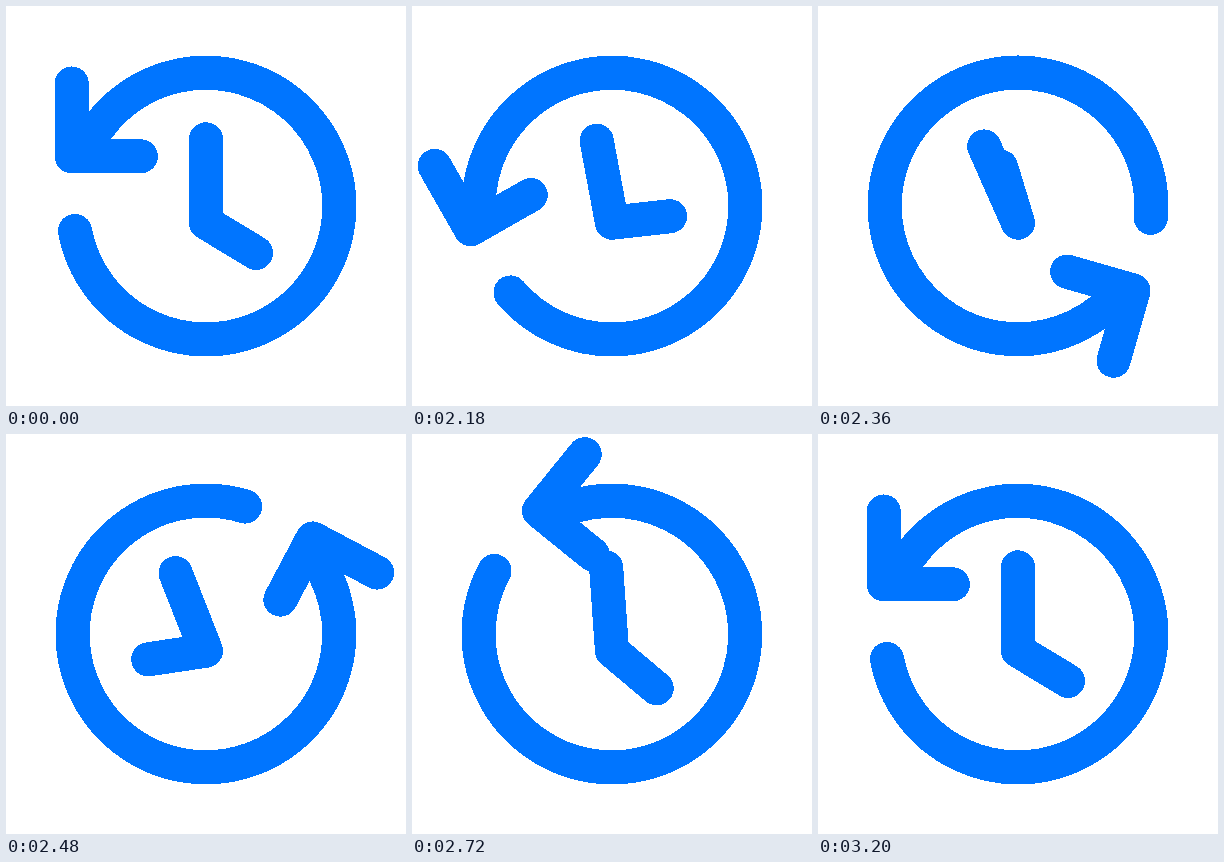
Write an HTML page that moves like this. It is 400x400 px and loops after 3.23 s.

```html
<!DOCTYPE html>
<html lang="en">
<head>
<meta charset="utf-8">
<title>History icon</title>
<style>
  html, body { margin: 0; width: 100%; height: 100%; overflow: hidden; background: #fff; }
  svg { display: block; width: 100vw; height: 100vh; }
  path {
    fill: none; stroke: #0075ff; stroke-width: 34.1;
    stroke-linecap: round; stroke-linejoin: round; shape-rendering: crispEdges;
  }
</style>
</head>
<body>
<svg viewBox="0 0 400 400">
  <g id="arrow">
    <path d="M69 225A133.33 133.33 0 1 0 77.3 147.9"/>
    <path d="M65.7 77.5V150.3H134.8"/>
  </g>
  <path id="minute" d="M200 216.67V133.33"/>
  <path id="hour" d="M200 216.67L250 246.9"/>
</svg>
<script>
  const LOOP = 3230, START = 2000, STEP = 30;

  // Keys: [step, angle, x1, x2]; x1 and x2 shape the ease that leads to the key.
  const parts = [
    { id: 'arrow', cy: 200, keys: [[0.5, 0], [40, -360, 0.341, 0.148]] },
    { id: 'minute', cy: 216.67, keys: [[0.5, 0], [12.4, -24, 0.37, 0.63], [30.8, 4.5, 0.37, 0.63], [40, 0, 0.37, 0.63]] },
    { id: 'hour', cy: 216.67, keys: [[0.5, 0], [26.5, -363, 0.354, 0.712], [40, -360, 0.37, 0.63]] }
  ];
  for (const part of parts) part.el = document.getElementById(part.id);

  // Cubic bezier (x1, 0, x2, 1), solved by bisection.
  function ease(x, x1, x2) {
    let lo = 0, hi = 1, s = 0.5;
    for (let i = 0; i < 24; i++) {
      s = (lo + hi) / 2;
      const r = 1 - s;
      if (3 * r * r * s * x1 + 3 * r * s * s * x2 + s * s * s < x) lo = s;
      else hi = s;
    }
    return s * s * (3 - 2 * s);
  }

  function angleAt(keys, step) {
    if (step <= keys[0][0]) return keys[0][1];
    for (let i = 1; i < keys.length; i++) {
      const [from, a] = keys[i - 1], [to, b, x1, x2] = keys[i];
      if (step < to) return a + (b - a) * ease((step - from) / (to - from), x1, x2);
    }
    return keys[keys.length - 1][1];
  }

  function draw(time) {
    const step = Math.max(0, Math.floor((time % LOOP - START) / STEP));
    for (const { el, cy, keys } of parts) {
      el.setAttribute('transform', `rotate(${angleAt(keys, step)} 200 ${cy})`);
    }
  }

  const origin = performance.now();
  function tick() {
    draw(performance.now() - origin);
    requestAnimationFrame(tick);
  }
  tick();
</script>
</body>
</html>
```
